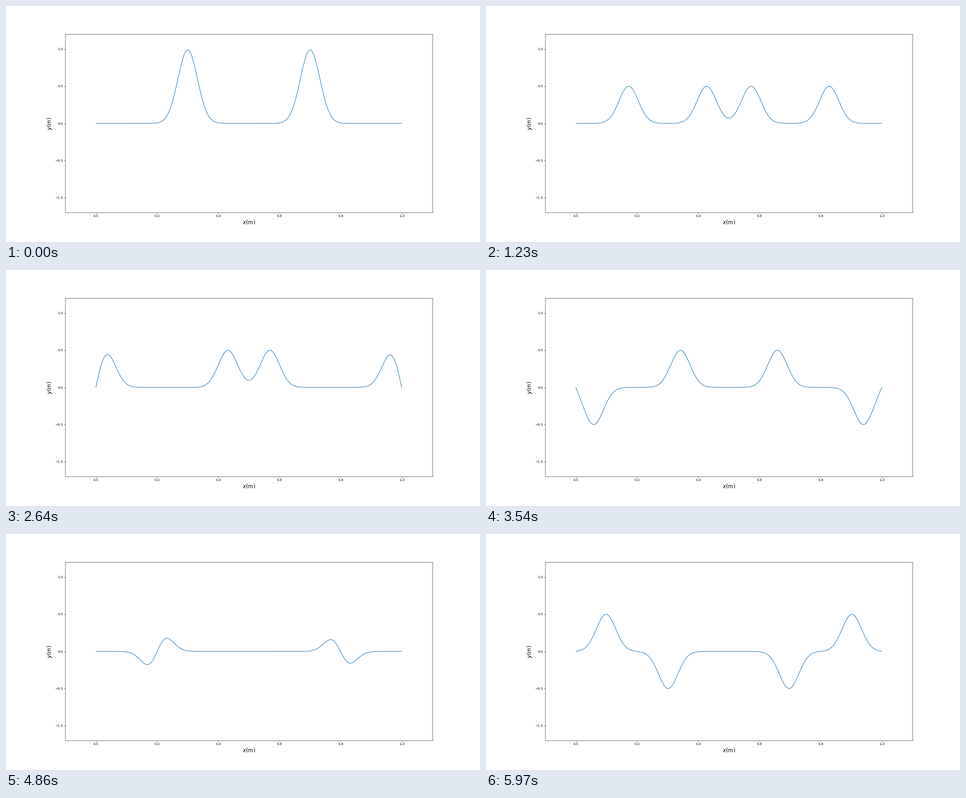
Animation of 1058x529 px, one loop 6000 ms. Source, as a matplotlib script:

```python
import numpy as np
import matplotlib.pyplot as plt
from matplotlib.animation import FuncAnimation

FRAMES = 200
INTERVAL = 30
STEP = 0.003      # distance each pulse travels per frame
START = 0.0045    # distance already travelled at the first frame

plt.rcParams["font.family"] = "DejaVu Sans"

x = np.arange(1000) * 0.001
end = x[-1]


def pulse(x, center):
    return 0.5 * np.exp(-500 * (x - center) ** 2)


def travelling(x, shift):
    """Both initial humps, split into left and right movers."""
    return sum(pulse(x, c + d * shift) for c in (0.3, 0.7) for d in (-1, 1))


def string(shift):
    """Fixed ends: inverted mirror images reflect the pulses."""
    return (travelling(x, shift) - travelling(-x, shift)
            - travelling(2 * end - x, shift))


fig = plt.figure(figsize=(20, 10), dpi=52.9, facecolor="white")
ax = fig.add_axes([0.125, 0.125, 0.775, 0.755])
ax.set_xlim(-0.1, 1.1)
ax.set_ylim(-1.2, 1.2)
ax.set_xticks(np.arange(6) * 0.2)
ax.set_yticks(np.arange(-2, 3) * 0.5)
ax.set_xlabel("$x(m)$", fontsize=16)
ax.set_ylabel("$y(m)$", fontsize=16)
line, = ax.plot(x, string(START), color="#1f77b4", lw=1.5)


def update(i):
    line.set_ydata(string(START + STEP * i))
    return line,


anim = FuncAnimation(fig, update, frames=FRAMES, interval=INTERVAL,
                     repeat=True, repeat_delay=0)
plt.show()
```
